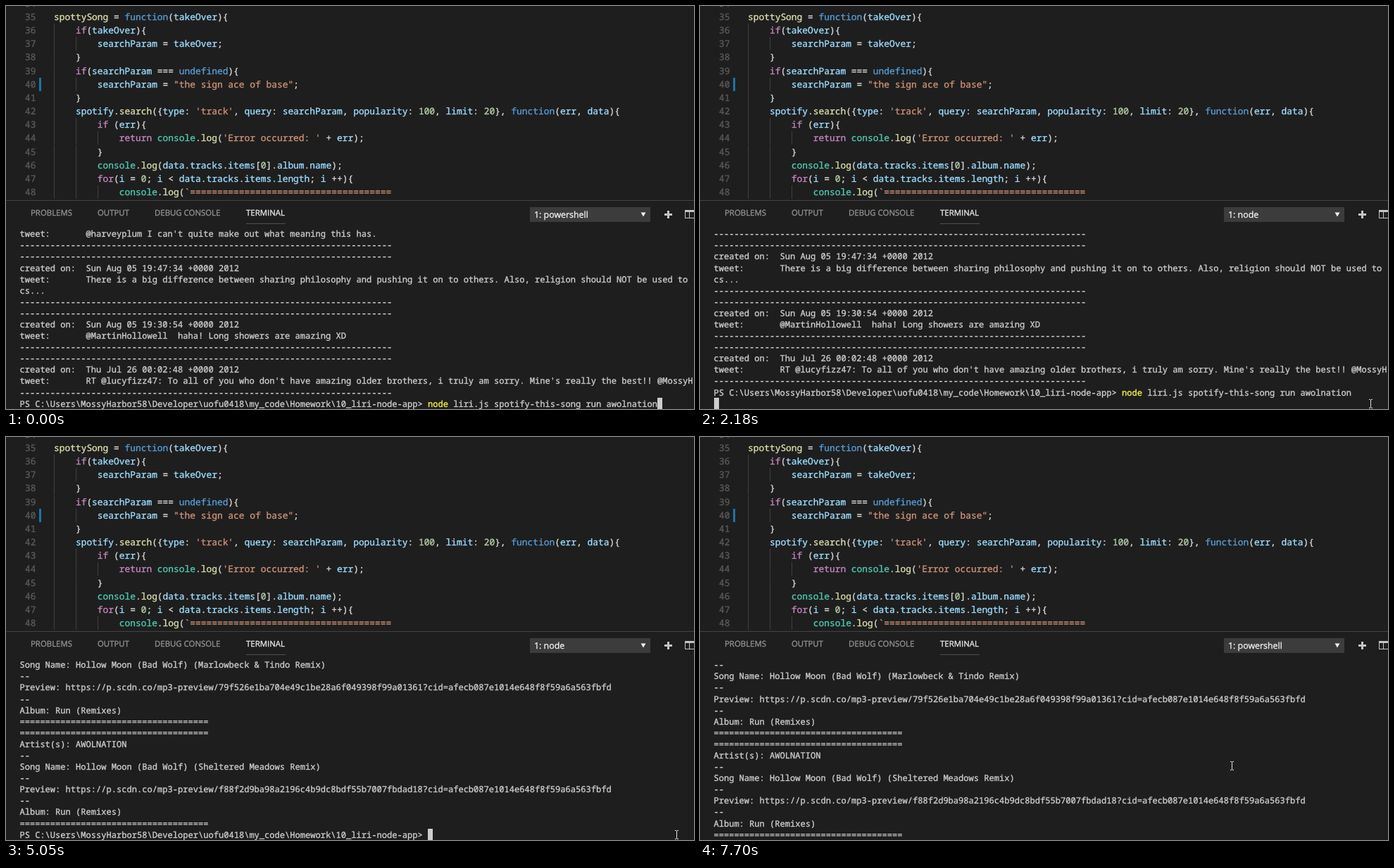
These frames come from a looping animation (977x573 px, 8 s). An HTML page with a canvas:

```html
<!DOCTYPE html>
<html lang="en">
<head>
<meta charset="utf-8">
<title>Editor and terminal</title>
<style>
html, body { margin: 0; width: 100%; height: 100%; overflow: hidden; background: #1e1e1e; }
canvas { display: block; }
</style>
</head>
<body>
<canvas id="stage" width="977" height="573"></canvas>
<script>
const ctx = document.getElementById('stage').getContext('2d');
const LOOP = 8000;

const code = [
  '',
  'spottySong = function(takeOver){',
  '    if(takeOver){',
  '        searchParam = takeOver;',
  '    }',
  '    if(searchParam === undefined){',
  '        searchParam = "the sign ace of base";',
  '    }',
  "    spotify.search({type: 'track', query: searchParam, popularity: 100, limit: 20}, function(err, data){",
  '        if (err){',
  "            return console.log('Error occurred: ' + err);",
  '        }',
  '        console.log(data.tracks.items[0].album.name);',
  '        for(i = 0; i < data.tracks.items.length; i ++){',
  '            console.log(`' + '='.repeat(37)
];

// One capture group per colour, in the same order as `palette`.
const tokens = /('[^']*'|"[^"]*"|`.*)|\b(if|return|for)\b|\b(function|undefined)\b|\b(spottySong|search(?=\()|log)\b|\b(console)\b|(\d+)|([A-Za-z]\w*)|([^\w'"`]+)/g;
const palette = ['#ce9178', '#c586c0', '#569cd6', '#dcdcaa', '#4ec9b0', '#b5cea8', '#9cdcfe', '#d4d4d4'];

const dashes = '-'.repeat(73);
const bars = '='.repeat(37);
const prompt = 'PS C:\\Users\\MossyHarbor58\\Developer\\uofu0418\\my_code\\Homework\\10_liri-node-app> ';
const command = 'node liri.js spotify-this-song run awolnation';
const created = when => 'created on:  ' + when + ' +0000 2012';
const tweet = text => 'tweet:       ' + text;
const preview = hash => 'Preview: https://p.scdn.co/mp3-preview/' + hash + '?cid=afecb087e1014e648f8f59a6a563fbfd';

const tweets = [
  tweet("@harveyplum I can't quite make out what meaning this has."),
  dashes, dashes,
  created('Sun Aug 05 19:47:34'),
  tweet('There is a big difference between sharing philosophy and pushing it on to others. Also, religion should NOT be used to'),
  'cs...',
  dashes, dashes,
  created('Sun Aug 05 19:30:54'),
  tweet('@MartinHollowell  haha! Long showers are amazing XD'),
  dashes, dashes,
  created('Thu Jul 26 00:02:48'),
  tweet("RT @lucyfizz47: To all of you who don't have amazing older brothers, i truly am sorry. Mine's really the best!! @MossyH"),
  dashes,
  prompt + command
];

const song = (remix, hash) => [
  '--',
  'Song Name: Hollow Moon (Bad Wolf) (' + remix + ' Remix)',
  '--',
  preview(hash),
  '--',
  'Album: Run (Remixes)',
  bars
];
const songs = [
  ...song('Marlowbeck & Tindo', '79f526e1ba704e49c1be28a6f049398f99a01361'),
  bars,
  'Artist(s): AWOLNATION',
  ...song('Sheltered Meadows', 'f88f2d9ba98a2196c4b9dc8bdf55b7007fbdad18'),
  prompt
];

function terminalRows(t) {
  if (t < 2180) return tweets;
  if (t < 2790) return [...tweets.slice(1), ''];
  if (t < 5050) return [...tweets.slice(2), 'Action Logged', ''];
  return t < 7700 ? songs.slice(1) : songs.slice(0, 16);
}

function rect(x, y, w, h, color) {
  ctx.fillStyle = color;
  ctx.fillRect(x, y, w, h);
}

// A hairline outline gives the glyphs the sturdier stems of the editor font.
function ink(text, x, y, color) {
  ctx.fillStyle = ctx.strokeStyle = color;
  ctx.lineWidth = 0.35;
  ctx.fillText(text, x, y);
  ctx.strokeText(text, x, y);
}

function label(text, x, y, size, color) {
  ctx.font = size + 'px "Open Sans", sans-serif';
  ctx.letterSpacing = '0px';
  ink(text, x, y, color);
}

function useGrid(cell) {
  ctx.font = cell / 0.6 + 'px "Noto Sans Mono", monospace';
  ctx.letterSpacing = '0px';
  ctx.letterSpacing = cell - ctx.measureText('M').width + 'px';
}

function write(text, x, y, color) {
  ink(text, x, Math.round(y), color);
}

function drawEditor() {
  const cell = 7.73, lineH = 19.15, left = 68;
  useGrid(cell);
  code.forEach((line, i) => {
    const top = 6 + (i - 1) * lineH, base = top + 14;
    write(String(34 + i), 27, base, '#5a5a5a');
    const indent = line.search(/\S/);
    for (let col = 0; col < indent; col += 4) {
      rect(Math.round(left + col * cell), Math.round(top), 1, 19, '#404040');
    }
    for (const m of line.matchAll(tokens)) {
      const kind = m.slice(1).findIndex(g => g !== undefined);
      write(m[0], left + m.index * cell, base, palette[kind]);
    }
  });
  rect(47, 102, 3, 19, '#1b75a8');
}

function drawPanel(t) {
  rect(0, 275, 977, 298, '#1e1e1e');
  rect(0, 276, 977, 1, '#434343');
  label('PROBLEMS', 35, 298, 11.4, '#919191');
  label('OUTPUT', 130, 298, 11.4, '#919191');
  label('DEBUG CONSOLE', 211, 298, 11.4, '#919191');
  label('TERMINAL', 341, 298, 11.4, '#e7e7e7');
  rect(341, 309, 56, 1, '#505050');

  rect(744, 286, 171, 21, '#3c3c3c');
  label(t >= 2180 && t < 5130 ? '1: node' : '1: powershell', 750, 301, 12.4, '#f0f0f0');
  ctx.fillStyle = '#f0f0f0';
  ctx.beginPath();
  ctx.moveTo(901.5, 293.5);
  ctx.lineTo(908.5, 293.5);
  ctx.lineTo(905, 299.5);
  ctx.fill();

  rect(935, 295, 11, 3, '#c5c5c5');
  rect(939, 291, 3, 11, '#c5c5c5');
  rect(964, 290, 13, 12, '#c5c5c5');
  rect(965, 293, 5, 8, '#1e1e1e');
  rect(971, 293, 6, 8, '#1e1e1e');
}

function drawTerminal(t, mouse) {
  const cell = 7.244, rowH = 16.09, left = 19.4, top = 316;
  const rows = terminalRows(t);
  useGrid(cell);
  rows.forEach((row, i) => {
    const y = top + i * rowH, base = y + 12.3;
    write(row, left, base, '#cccccc');
    if (row.endsWith(command)) {
      const x = left + prompt.length * cell;
      rect(x, y, 4 * cell, rowH, '#1e1e1e');
      write('node', x, base, '#f5f543');
    }
    const link = row.indexOf('https');
    if (link > 0 && mouse) {
      const from = left + link * cell, to = left + row.length * cell;
      const over = mouse.x > from && mouse.x < to && mouse.y > y && mouse.y < y + rowH;
      if (over) rect(from, Math.round(base) + 2, to - from, 1, '#cccccc');
    }
  });
  const last = rows[rows.length - 1];
  if (last !== bars) rect(Math.ceil(left + last.length * cell), 557, 7, 16, '#cccccc');
}

// Each move runs in discrete steps between two points.
const moves = [
  { start: 300, end: 450, steps: 3, from: [912, 577.5], to: [952, 558.5] },
  { start: 620, end: 770, steps: 3, from: [952, 558.5], to: [952, 565.5] },
  { start: 5680, end: 6220, steps: 8, from: [952, 565.5], to: [754.5, 467.5], ease: p => p * p * (3 - 2 * p) }
];

function pointer(t) {
  const m = moves.filter(v => t >= v.start).pop();
  if (!m) return null;
  const k = Math.floor((t - m.start) / (m.end - m.start) * (m.steps - 1) + 1e-6) + 1;
  let p = Math.min(1, k / m.steps);
  if (m.ease) p = m.ease(p);
  const mix = i => m.from[i] + (m.to[i] - m.from[i]) * p;
  return { x: mix(0), y: mix(1) };
}

function drawPointer(mouse) {
  const x = Math.round(mouse.x), y = Math.round(mouse.y - 6.5), color = '#e0e0e0';
  rect(x, y + 1, 1, 11, color);
  for (const edge of [y, y + 12]) {
    rect(x - 2, edge, 2, 1, color);
    rect(x + 1, edge, 2, 1, color);
  }
}

function draw(t) {
  const mouse = pointer(t);
  rect(0, 0, 977, 573, '#1e1e1e');
  drawEditor();
  drawPanel(t);
  drawTerminal(t, mouse);
  if (mouse) drawPointer(mouse);
}

ctx.textBaseline = 'alphabetic';
ctx.textRendering = 'geometricPrecision';
ctx.lineJoin = 'round';
const begin = performance.now();
function tick() {
  draw((performance.now() - begin) % LOOP);
  requestAnimationFrame(tick);
}
tick();
</script>
</body>
</html>
```
